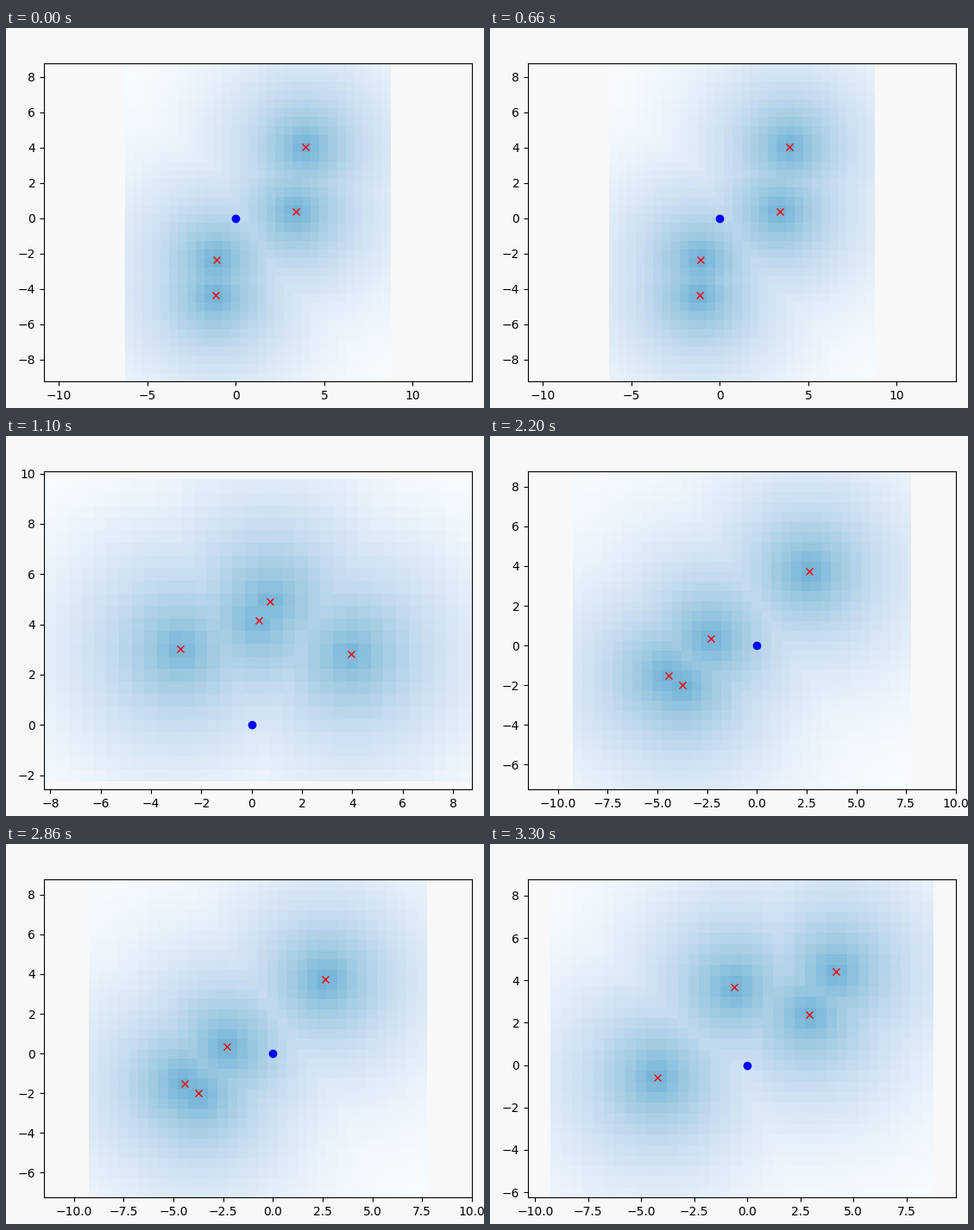
Write a matplotlib script that moves like this. It is 554x441 px and loops after 4.2 s.

```python
import math

import matplotlib.pyplot as plt
import numpy as np
from matplotlib.animation import FuncAnimation

W, H, DPI = 554, 441, 100
AX_W, AX_H = 0.775 * 640, 0.77 * 479    # default axes of a 640 x 479 window
LEFT, TOP = 44, 41.48
CELL = 0.5      # grid resolution
SIGMA = 5.0     # spread of the likelihood
MARGIN = 5      # map border around the obstacles
STEP_MS = 100
HOLD = 11       # steps per scene
FRAMES = 42
PAPER = "#f8f8f8"

# obstacle positions of each scene
SCENES = [
    [(3.93, 4.04), (3.40, 0.38), (-1.09, -2.35), (-1.14, -4.36)],
    [(-2.83, 3.03), (0.73, 4.91), (0.28, 4.16), (3.95, 2.82)],
    [(2.64, 3.74), (-2.31, 0.35), (-4.43, -1.51), (-3.74, -1.99)],
    [(-0.61, 3.69), (4.18, 4.42), (2.92, 2.38), (-4.23, -0.58)],
]

erfc = np.vectorize(math.erfc)


def axis_cells(values):
    """Cell centres along one axis, covering the obstacles plus the margin."""
    return np.arange(round(min(values) - MARGIN), round(max(values) + MARGIN), CELL)


def edges(centres):
    return np.append(centres, centres[-1] + CELL) - CELL / 2


def likelihood(xs, ys, ox, oy):
    """Gaussian tail probability of the distance to the nearest obstacle."""
    gx, gy = np.meshgrid(xs, ys)
    dist = np.min([np.hypot(gx - px, gy - py) for px, py in zip(ox, oy)], axis=0)
    return 0.5 * erfc(dist / (SIGMA * math.sqrt(2)))


def fit_view(ex, ey):
    """Equal-scale limits that keep the whole map centred in the axes."""
    scale = min(AX_W / np.ptp(ex), AX_H / np.ptp(ey))
    cx, cy = (ex[0] + ex[-1]) / 2, (ey[0] + ey[-1]) / 2
    half_w, half_h = AX_W / scale / 2, AX_H / scale / 2
    ax.set_xlim(cx - half_w, cx + half_w)
    ax.set_ylim(cy - half_h, cy + half_h)


def draw(i):
    ox, oy = zip(*SCENES[min(i // HOLD, len(SCENES) - 1)])
    xs, ys = axis_cells(ox), axis_cells(oy)
    ex, ey = edges(xs), edges(ys)
    ax.clear()
    ax.set_facecolor(PAPER)
    ax.pcolor(ex, ey, likelihood(xs, ys, ox, oy), vmax=1.0, cmap="Blues")
    ax.plot(ox, oy, "xr")
    ax.plot(0, 0, "ob")
    fit_view(ex, ey)
    return []


fig = plt.figure(figsize=(W / DPI, H / DPI), dpi=DPI, facecolor=PAPER)
ax = fig.add_axes([LEFT / W, 1 - (TOP + AX_H) / H, AX_W / W, AX_H / H])

anim = FuncAnimation(fig, draw, frames=FRAMES, interval=STEP_MS,
                     repeat=True, repeat_delay=0, blit=False)
plt.show()
```
